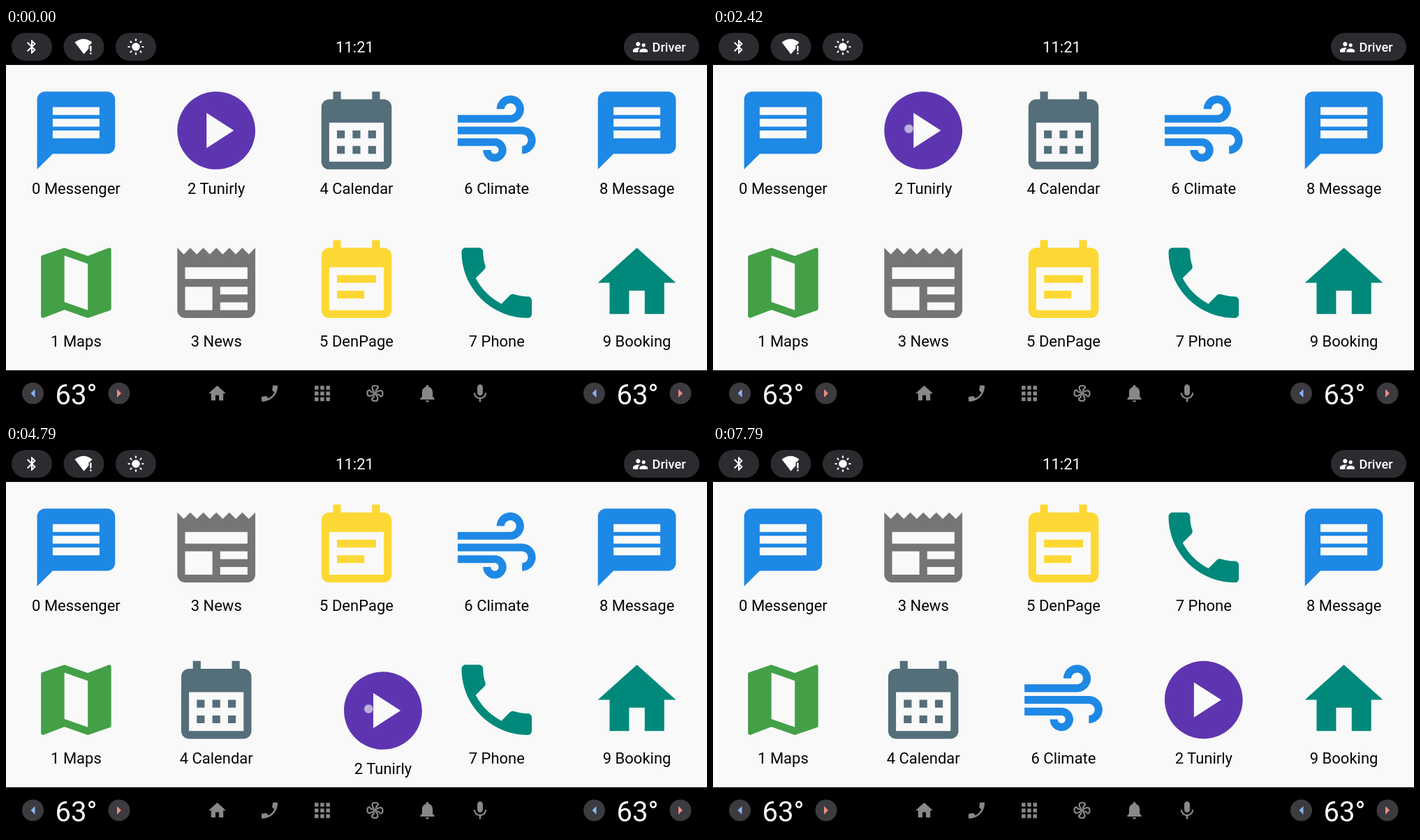
These frames come from a looping animation (1004x558 px, 8000 ms). An HTML page:

```html
<!DOCTYPE html>
<html lang="en">
<head>
<meta charset="utf-8">
<title>Car launcher</title>
<style>
html, body { margin: 0; width: 100%; height: 100%; overflow: hidden; background: #000; }
svg { display: block; width: 100%; height: 100%; font-family: Roboto, "Noto Sans", sans-serif; }
.label { font-size: 22px; text-anchor: middle; fill: #050505; }
.clock { font-size: 22px; text-anchor: middle; fill: #fff; }
.temp { font-size: 40px; fill: #fff; }
.user { font-size: 18.3px; font-weight: 500; fill: #fff; }
</style>
</head>
<body>
<svg id="stage" viewBox="0 0 1004 558" xmlns="http://www.w3.org/2000/svg">
  <rect width="1004" height="558" fill="#000"/>
  <rect y="53" width="1004" height="438" fill="#f9f9f9"/>
  <g id="apps"></g>
  <circle id="touch" r="6.3" fill="#fff" fill-opacity=".6" stroke="#808890" stroke-opacity=".45"/>
  <g id="bars"></g>
</svg>
<script>
const BLUE = '#1e88e5', TEAL = '#00897b';
const paths = {
  message: 'M20 2H4c-1.1 0-1.99.9-1.99 2L2 22l4-4h14c1.1 0 2-.9 2-2V4c0-1.1-.9-2-2-2zm-2 12H6v-2h12v2zm0-3H6V9h12v2zm0-3H6V6h12v2z',
  map: 'M20.5 3l-.16.03L15 5.1 9 3 3.36 4.9c-.21.07-.36.25-.36.48V20.5c0 .28.22.5.5.5l.16-.03L9 18.9l6 2.1 5.64-1.9c.21-.07.36-.25.36-.48V3.5c0-.28-.22-.5-.5-.5zM15 19l-6-2.11V5l6 2.11V19z',
  play: 'M12 2C6.48 2 2 6.48 2 12s4.48 10 10 10 10-4.48 10-10S17.52 2 12 2zM9.5 16.5v-9l7 4.5z',
  news: 'M22 3l-1.67 1.67L18.67 3 17 4.67 15.33 3l-1.66 1.67L12 3l-1.67 1.67L8.67 3 7 4.67 5.33 3 3.67 4.67 2 3v16c0 1.1.9 2 2 2h16c1.1 0 2-.9 2-2V3zM11 19H4v-6h7v6zm9 0h-7v-2h7v2zm0-4h-7v-2h7v2zm0-4H4V8h16v3z',
  calendar: 'M19 4h-1V2h-2v2H8V2H6v2H5c-1.11 0-1.99.9-1.99 2L3 20c0 1.1.89 2 2 2h14c1.1 0 2-.9 2-2V6c0-1.1-.9-2-2-2zm0 16H5V10h14v10zM9 14H7v-2h2v2zm4 0h-2v-2h2v2zm4 0h-2v-2h2v2zm-8 4H7v-2h2v2zm4 0h-2v-2h2v2zm4 0h-2v-2h2v2z',
  note: 'M17 10H7v2h10v-2zm2-7h-1V1h-2v2H8V1H6v2H5c-1.11 0-1.99.9-1.99 2L3 19c0 1.1.89 2 2 2h14c1.1 0 2-.9 2-2V5c0-1.1-.9-2-2-2zm0 16H5V8h14v11zm-5-5H7v2h7v-2z',
  air: 'M14.5 17c0 1.65-1.35 3-3 3s-3-1.35-3-3h2c0 .55.45 1 1 1s1-.45 1-1-.45-1-1-1H2v-2h9.5c1.65 0 3 1.35 3 3zM19 6.5C19 4.57 17.43 3 15.5 3S12 4.57 12 6.5h2c0-.83.67-1.5 1.5-1.5s1.5.67 1.5 1.5S16.33 8 15.5 8H2v2h13.5c1.93 0 3.5-1.57 3.5-3.5zm-.5 4.5H2v2h16.5c.83 0 1.5.67 1.5 1.5s-.67 1.5-1.5 1.5v2c1.93 0 3.5-1.57 3.5-3.5S20.43 11 18.5 11z',
  phone: 'M6.62 10.79c1.44 2.83 3.76 5.14 6.59 6.59l2.2-2.2c.27-.27.67-.36 1.02-.24 1.12.37 2.33.57 3.57.57.55 0 1 .45 1 1V20c0 .55-.45 1-1 1-9.39 0-17-7.61-17-17 0-.55.45-1 1-1h3.5c.55 0 1 .45 1 1 0 1.25.2 2.45.57 3.57.11.35.03.74-.25 1.02l-2.2 2.2z',
  home: 'M10 20v-6h4v6h5v-8h3L12 3 2 12h3v8z',
  bluetooth: 'M17.71 7.71L12 2h-1v7.59L6.41 5 5 6.41 10.59 12 5 17.59 6.41 19 11 14.41V22h1l5.71-5.71-4.3-4.29 4.3-4.29zM13 5.83l1.88 1.88L13 9.59V5.83zm1.88 10.46L13 18.17v-3.76l1.88 1.88z',
  people: 'M16.5 12c1.38 0 2.49-1.12 2.49-2.5S17.88 7 16.5 7 14 8.12 14 9.5s1.12 2.5 2.5 2.5zM9 11c1.66 0 2.99-1.34 2.99-3S10.66 5 9 5 6 6.34 6 8s1.34 3 3 3zm7.5 3c-1.83 0-5.5.92-5.5 2.75V19h11v-2.25c0-1.83-3.67-2.75-5.5-2.75zM9 13c-2.33 0-7 1.17-7 3.5V19h7v-2.25c0-.85.33-2.34 2.37-3.47C10.5 13.1 9.66 13 9 13z',
  grid: 'M4 4h4v4H4zM10 4h4v4h-4zM16 4h4v4h-4zM4 10h4v4H4zM10 10h4v4h-4zM16 10h4v4h-4zM4 16h4v4H4zM10 16h4v4h-4zM16 16h4v4h-4z',
  bell: 'M12 22c1.1 0 2-.9 2-2h-4c0 1.1.89 2 2 2zm6-6v-5c0-3.07-1.64-5.64-4.5-6.32V4c0-.83-.67-1.5-1.5-1.5s-1.5.67-1.5 1.5v.68C7.63 5.36 6 7.92 6 11v5l-2 2v1h16v-1l-2-2z',
  mic: 'M12 14c1.66 0 2.99-1.34 2.99-3L15 5c0-1.66-1.34-3-3-3S9 3.34 9 5v6c0 1.66 1.34 3 3 3zm5.3-3c0 3-2.54 5.1-5.3 5.1S6.7 14 6.7 11H5c0 3.41 2.72 6.23 6 6.72V21h2v-3.28c3.28-.48 6-3.3 6-6.72h-1.7z'
};

const icon = (name, x, y, scale, fill, flip = 1) =>
  `<path transform="translate(${x} ${y}) scale(${scale * flip} ${scale}) translate(-12 -12)" fill="${fill}" fill-rule="evenodd" d="${paths[name]}"/>`;
const pill = (x, w) => `<rect x="${x}" y="7" width="${w}" height="40" rx="20" fill="#2b2b30"/>`;
const spokes = (count, body) => Array.from({ length: count }, (_, i) =>
  `<g transform="rotate(${i * 360 / count})">${body}</g>`).join('');

function statusBar() {
  const wifi = '<path d="M98.5 20.5Q111 11 123.5 20.5L120 24.5H118.5V29.5L111.5 37.5Z"/>' +
    '<path d="M120.2 25.5h2.3v8h-2.3zM120.2 35.2h2.3v2.3h-2.3z"/>';
  const sun = '<g transform="translate(186 27)"><circle r="5.8"/>' +
    spokes(8, '<path d="M0-9.2V-10.6" stroke="#fff" stroke-width="2.2" stroke-linecap="round"/>') + '</g>';
  return pill(8, 58) + pill(82.5, 58) + pill(157, 58) + pill(885, 108) +
    icon('bluetooth', 37, 27, 1, '#fff') + `<g fill="#fff">${wifi}${sun}</g>` +
    '<text class="clock" x="499.5" y="34.5">11:21</text>' +
    icon('people', 908.5, 27.3, 1.05, '#fff') + '<text class="user" x="925.5" y="34">Driver</text>';
}

function climate(x) {
  const arrow = (cx, dir, fill) => `<circle cx="${cx}" cy="524" r="15.5" fill="#3b3b40"/>` +
    `<path d="M${cx + 3 * dir} 524l${-6 * dir}-6v12z" fill="${fill}"/>`;
  return arrow(x + 38.5, -1, '#8ab4f8') + arrow(x + 162, 1, '#f28b82') +
    `<text class="temp" x="${x + 70.5}" y="540">63°</text>`;
}

function navBar() {
  const gray = '#888';
  const blade = '<path d="M-1.5-2.5C-5-6-5-11 0-11C5-11 5.5-8 3-6.5C1.5-5.6 1.5-4 2-2.5"/>';
  return climate(0) + climate(804) +
    icon('home', 302.5, 524.3, 1.25, gray) + icon('phone', 377.5, 524.3, 1.28, gray, -1) +
    icon('grid', 453, 524.3, 1.37, gray) +
    `<g transform="translate(528.5 524)" fill="none" stroke="${gray}" stroke-width="2.2">${spokes(4, blade)}<circle r="1.6"/></g>` +
    icon('bell', 603.5, 524, 1.27, gray) + icon('mic', 679, 524.5, 1.32, gray);
}

const apps = [
  ['Messenger', 'message', BLUE], ['Maps', 'map', '#43a047'],
  ['Tunirly', 'play', '#5e35b1'], ['News', 'news', '#757575'],
  ['Calendar', 'calendar', '#546e7a'], ['DenPage', 'note', '#fdd835'],
  ['Climate', 'air', BLUE], ['Phone', 'phone', TEAL],
  ['Message', 'message', BLUE], ['Booking', 'home', TEAL]
];
const DRAGGED = 2;
const appLayer = document.getElementById('apps');
const touch = document.getElementById('touch');
document.getElementById('bars').innerHTML = statusBar() + navBar();
appLayer.innerHTML = apps.map(([name, shape, fill], i) =>
  `<g>${icon(shape, 0, 0, 5.587, fill)}<text class="label" y="91">${i} ${name}</text></g>`).join('');
const tiles = [...appLayer.children];
appLayer.append(tiles[DRAGGED]);

const slot = i => [100.4 + 200.8 * Math.floor(i / 2), 147 + 218.6 * (i % 2)];
const unit = (t, start, length) => Math.min(1, Math.max(0, (t - start) / length));
const smooth = u => u * u * (3 - 2 * u);
const settle = u => (1 - Math.cos(Math.PI * u)) / 2;
const mix = (a, b, k) => a.map((v, i) => v + (b[i] - v) * k);

const LOOP = 8000, PRESS = 2250, RELEASE = 7080, MOVE = 250;
const SWAPS = [4337, 5970];
const HOLD = [540, 381], DROP = [710, 378], BOW = 2.5;

// Position along both drags; the tile trails the finger by a short lag.
function dragPoint(t, lag1, lag2) {
  const k = smooth(unit(t, 3150 + lag1, 860));
  const [x, y] = mix(slot(2), HOLD, k);
  return mix([x + BOW * Math.sin(Math.PI * k), y], DROP, smooth(unit(t, 5250 + lag2, 685)));
}

function tilePoint(i, t) {
  if (i === DRAGGED) return mix(dragPoint(t, 120, 75), slot(7), settle(unit(t, RELEASE, MOVE)));
  if (i < 3 || i > 7) return slot(i);
  const start = SWAPS[i < 6 ? 0 : 1];
  return mix(slot(i), slot(i - 1), settle(unit(t, start, MOVE)));
}

const place = (el, [x, y]) => el.setAttribute('transform', `translate(${x.toFixed(2)} ${y.toFixed(2)})`);

function draw(t) {
  tiles.forEach((tile, i) => place(tile, tilePoint(i, t)));
  const [x, y] = dragPoint(t, 0, 0);
  place(touch, [x - 20.7, y - 2.5]);
  touch.style.display = t >= PRESS && t < RELEASE ? '' : 'none';
}

const begin = performance.now();
function tick() {
  draw((performance.now() - begin) % LOOP);
  requestAnimationFrame(tick);
}
tick();
</script>
</body>
</html>
```
